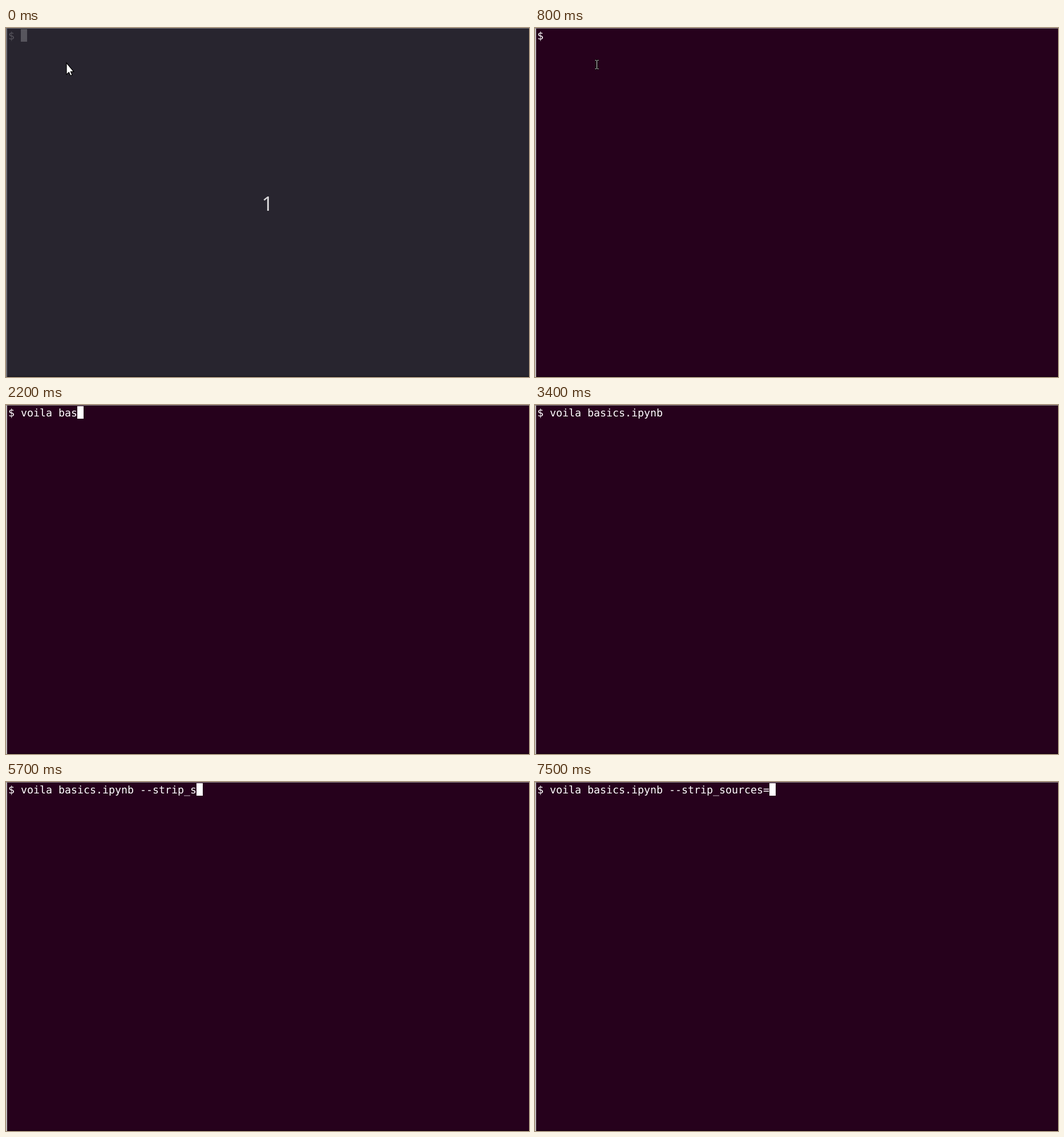
An HTML page for the animation above (8 s loop, 917 by 611 pixels).

```html
<!DOCTYPE html>
<html lang="en">
<head>
<meta charset="utf-8">
<title>Terminal typing</title>
<style>
  html, body { margin: 0; width: 100%; height: 100%; overflow: hidden; background: #26011c; }
  svg { display: block; }
  text { white-space: pre; text-rendering: geometricPrecision; }
  #line { font: 18.27px "DejaVu Sans Mono", monospace; }
  #count { font: 35px "Noto Sans", sans-serif; fill: #d4d3d5; text-anchor: middle; }
</style>
</head>
<body>
<svg width="917" height="611" viewBox="0 0 917 611">
  <rect id="screen" width="917" height="611"/>
  <rect y="609" width="917" height="2" fill="#000" opacity=".25"/>
  <rect id="leftEdge" width="2" height="611"/>
  <rect id="topEdge" width="917" height="1"/>
  <g id="ink">
    <text id="line" x="4" y="20"></text>
    <rect id="cursor" y="2" width="11" height="22"/>
  </g>
  <g id="intro">
    <text id="count" x="458.5" y="320">1</text>
    <path d="M106 61V81.5L110.3 77.6L113 83.5L116 82.2L113.4 76.4H118.8Z" fill="#fff" stroke="#000" stroke-width="1.2"/>
  </g>
  <g id="beam" fill="none">
    <path id="beamShape" d="M105.5 56.5H107.5L108.5 57.5L109.5 56.5H111.5M105.5 71.5H107.5L108.5 70.5L109.5 71.5H111.5M108.5 57V71" stroke="#000" stroke-width="3"/>
    <use href="#beamShape" style="display:none"/>
    <path d="M105.5 56.5H107.5L108.5 57.5L109.5 56.5H111.5M105.5 71.5H107.5L108.5 70.5L109.5 71.5H111.5M108.5 57V71" stroke="#e4e0e2"/>
  </g>
</svg>
<script>
const LOOP = 8000, CELL = 11, MARGIN = 4;
const el = id => document.getElementById(id);

// [time in ms, text typed at that moment]
const strokes = [
  [1200, "v"], [1300, "o"], [1400, "i"], [1500, "l"], [1600, "a"], [1800, " "],
  [2000, "b"], [2100, "a"], [2200, "s"], [2400, "i"], [2900, "cs.ipynb "],
  [3700, "-"], [3800, "-"], [4000, "s"], [4300, "t"], [4400, "ri"], [4500, "p"],
  [5300, "_"], [5700, "s"], [5800, "ou"], [6000, "r"], [6400, "c"], [6500, "e"],
  [6900, "s"], [7500, "="]
];
const blinks = [[800, 1200], [3400, 3700]];
const show = (id, visible) => el(id).style.display = visible ? "" : "none";
const paint = (id, color) => el(id).setAttribute("fill", color);

function draw(t) {
  const dimmed = t < 100;
  const line = "$ " + strokes.filter(([at]) => at <= t).map(([, keys]) => keys).join("");

  paint("screen", dimmed ? "#28252f" : "#26011c");
  paint("leftEdge", dimmed ? "#77757a" : "#c1bebd");
  paint("topEdge", dimmed ? "#77757a" : "#8d858a");
  paint("ink", dimmed ? "#57555d" : "#fff");

  el("line").textContent = line;
  el("cursor").setAttribute("x", MARGIN + CELL * line.length);
  show("cursor", !blinks.some(([from, to]) => t >= from && t < to));
  show("intro", dimmed);
  show("beam", !dimmed && t < 1200);
}

const start = performance.now();
function tick() {
  draw((performance.now() - start) % LOOP);
  requestAnimationFrame(tick);
}
tick();
</script>
</body>
</html>
```
